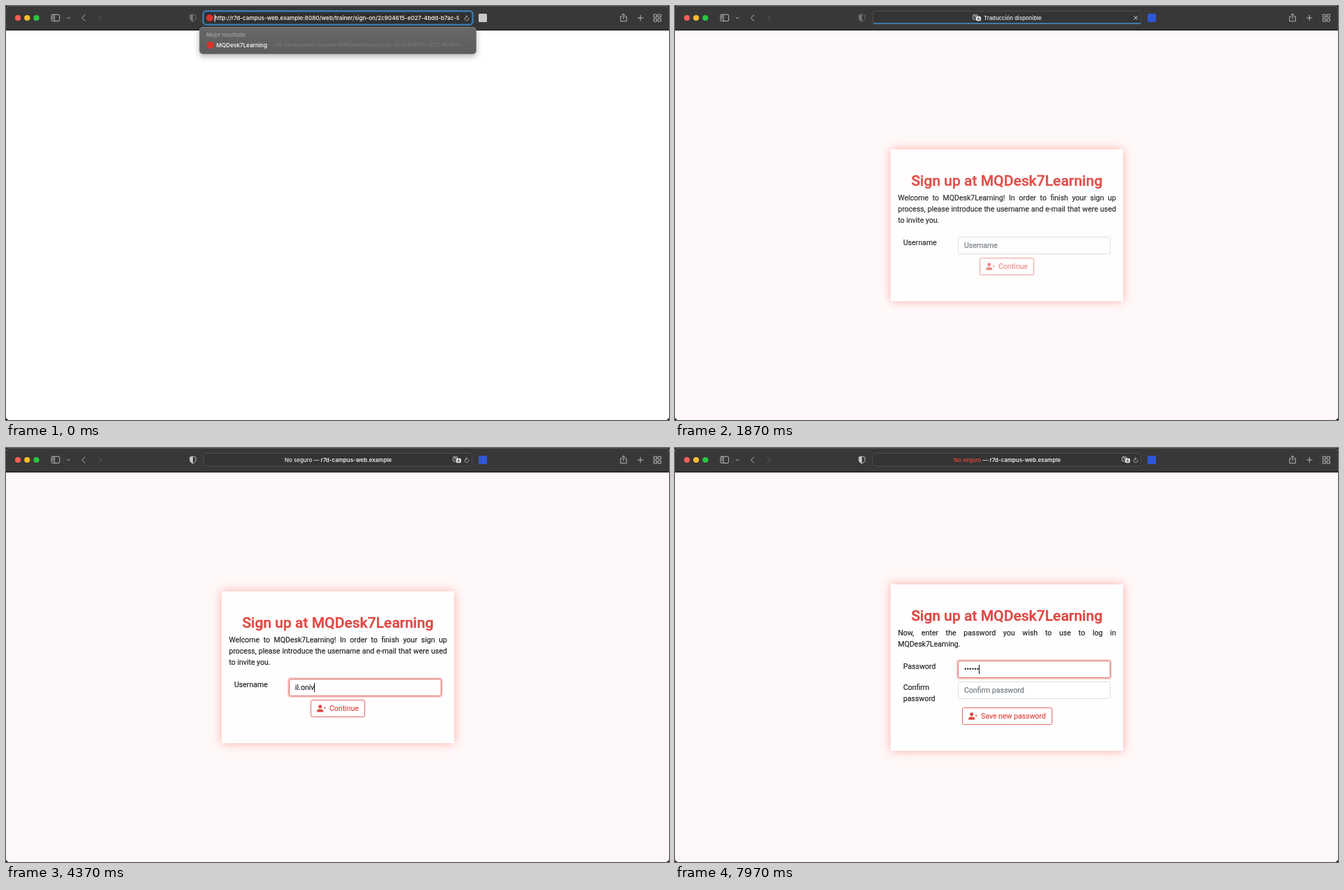
Write an HTML page that moves like this. It is 947 px wide and 592 px high and loops after 8000 ms.

```html
<!DOCTYPE html>
<html lang="en">
<head>
<meta charset="utf-8">
<title>Sign up</title>
<style>
  html, body { margin: 0; width: 100%; height: 100%; overflow: hidden; background: #000; }
  #win { position: absolute; left: 0; top: 0; width: 947px; height: 592px; overflow: hidden; border-radius: 5px; background: #fff; }
  svg { position: absolute; left: 0; top: 0; }
  #bar text, #drop { font-family: Inter, sans-serif; font-weight: 500; }
  #drop { position: absolute; left: 276px; top: 30px; width: 394px; height: 37px; border: 1px solid #858585; border-radius: 5px;
    background: linear-gradient(#676767, #5d5d5d); box-shadow: 0 3px 9px rgba(0,0,0,.3); white-space: nowrap; }
  #drop * { position: absolute; line-height: 12px; }
  #drop i { left: 10px; top: 20px; width: 10px; height: 10px; border-radius: 50%; background: #d8322c; }
  #drop small { left: 9px; top: 5px; font-size: 7.4px; font-weight: 600; color: #9c9c9c; }
  #drop b { left: 23.5px; top: 19px; font-size: 8.2px; font-weight: 500; color: #fff; }
  #drop span { left: 97px; top: 19px; width: 283px; font-size: 7.2px; font-weight: 400; color: #7d7d7d; overflow: hidden; text-overflow: ellipsis; }
  #page { position: absolute; inset: 0; font: 10.52px/16px Roboto, sans-serif; color: #1b1e22; -webkit-text-stroke: .15px; }
  .card { position: absolute; left: 308px; width: 332px; background: #fffefe; box-shadow: 0 0 13px rgba(244,67,54,.42); }
  .card > * { position: absolute; }
  h1 { left: 0; top: 32.1px; width: 332px; margin: 0; font-size: 21.04px; line-height: 25px; font-weight: 500; text-align: center;
    color: #e04641; white-space: nowrap; -webkit-text-stroke: .35px; }
  p { left: 10.5px; top: 61.6px; width: 311.5px; margin: 0; }
  p span { display: block; white-space: nowrap; }
  p .j { text-align: justify; text-align-last: justify; }
  label { left: 18px; width: 70px; }
  .field { left: 96px; width: 217.5px; height: 25px; box-sizing: border-box; padding-left: 8px; border: 1px solid #dadfe3; border-radius: 2.6px;
    background: #fff; line-height: 23.4px; white-space: nowrap; }
  .field u { display: inline-block; width: .8px; height: 12.5px; margin-right: -.8px; background: #111; vertical-align: -2.5px; }
  .field em { font-style: normal; color: #6c757d; }
  .btn { height: 25px; box-sizing: border-box; border: 1px solid #dc6965; border-radius: 2.6px; color: #e04641; line-height: 23.4px; padding-left: 26px; white-space: nowrap; }
  .btn svg { left: 8px; top: 6px; }
</style>
</head>
<body>
<div id="win">
  <div id="page">
    <div class="card" id="c1" style="top:205px;height:217px">
      <h1>Sign up at MQDesk7Learning</h1>
      <p><span class="j">Welcome to MQDesk7Learning! In order to finish your sign up</span>
        <span class="j">process, please introduce the username and e-mail that were used</span>
        <span>to invite you.</span></p>
      <label style="top:125.6px">Username</label>
      <div class="field" id="user" style="top:125.2px"></div>
      <div class="btn" id="go" style="left:127px;top:155.4px;width:78px">Continue</div>
    </div>
    <div class="card" id="c2" style="top:195px;height:238px">
      <h1>Sign up at MQDesk7Learning</h1>
      <p><span class="j">Now, enter the password you wish to use to log in</span>
        <span>MQDesk7Learning.</span></p>
      <label style="top:109.6px">Password</label>
      <div class="field" id="pass" style="top:109.2px"></div>
      <label style="top:139.6px">Confirm password</label>
      <div class="field" style="top:139.3px"><em>Confirm password</em></div>
      <div class="btn" style="left:102px;top:176.3px;width:129px">Save new password</div>
    </div>
  </div>

  <svg id="bar" width="947" height="36" fill="none" stroke-linecap="round" stroke-linejoin="round">
    <defs>
      <g id="tr">
        <rect x=".4" y=".4" width="7" height="6.4" rx="1.6" stroke="#ddd" stroke-width=".8"/>
        <path d="M2.2 2.4h3.4M3.9 1.6v.8M2.5 5l2.6-2.6" stroke="#ddd" stroke-width=".6"/>
        <rect x="5" y="2.4" width="7" height="6.6" rx="1.6" fill="#e6e6e6"/>
        <path d="M7.2 7.4 8.5 4l1.3 3.4M7.7 6.4h1.6" stroke="#333" stroke-width=".7"/>
      </g>
      <linearGradient id="fade"><stop offset="0" stop-color="#343434" stop-opacity="0"/><stop offset=".15" stop-color="#343434"/>
        <stop offset=".9" stop-color="#343434"/><stop offset="1" stop-color="#343434" stop-opacity="0"/></linearGradient>
      <clipPath id="clip"><rect x="297" y="8" width="350" height="18"/></clipPath>
    </defs>
    <rect width="947" height="35" fill="#383838"/>
    <path d="M0 .5H947" stroke="#565656" stroke-width=".8"/>
    <path d="M0 34.5H947" stroke="#111"/>
    <circle cx="17" cy="17" r="4.1" fill="#ff5f57"/><circle cx="30.2" cy="17" r="4.1" fill="#febc2e"/><circle cx="43.4" cy="17" r="4.1" fill="#28c840"/>
    <g stroke="#c6c6c6" stroke-width=".9">
      <rect x="65" y="12.2" width="11.6" height="9.4" rx="1.6"/><path d="M69.2 12.2v9.4M66.6 14.4h1M66.6 16.2h1M66.6 18h1"/>
      <path d="M87.2 16.2l2 1.8 2-1.8M112.8 12.8l-4.4 4.2 4.4 4.2"/>
      <path d="M131.8 12.8l4.4 4.2-4.4 4.2" stroke="#666"/>
      <path d="M82.5 12v10" stroke="#484848"/>
      <path d="M880 15h-2.2v6.8h8.6V15h-2.2M882.1 18.4v-7.2M880 13.2l2.1-2.1 2.1 2.1M902.4 17h7.6M906.2 13.2v7.6"/>
      <path d="M925.6 12.2h3.8v3.8h-3.8zM931.6 12.2h3.8v3.8h-3.8zM925.6 18.2h3.8v3.8h-3.8zM931.6 18.2h3.8v3.8h-3.8z"/>
    </g>
    <g id="shield"><path d="M267 12l4.2 1.3v4.2q0 3-4.2 4.7-4.2-1.7-4.2-4.7v-4.2z" stroke="#c8c8c8" stroke-width=".9"/>
      <path d="M267 12v10.2q-4.2-1.7-4.2-4.7v-4.2z" fill="#c8c8c8"/></g>
    <rect id="ext" x="675" y="11" width="12" height="12" rx="1.5"/>
    <rect x="282.3" y="7.5" width="383.4" height="18.4" rx="4" fill="#343434" stroke="#525252" stroke-width=".9"/>
    <rect id="ring" x="281.6" y="7.2" width="385" height="19.6" rx="4.6" fill="#303030" stroke="#3a7cb2" stroke-width="2.4"/>
    <circle id="fav" cx="291" cy="17" r="5" fill="#d8322c"/>
    <g clip-path="url(#clip)"><text id="url" y="20" font-size="8.15" fill="#fff"></text></g>
    <path id="ucaret" d="M298.2 12.2v10.4" stroke="#fff" stroke-width=".9"/>
    <rect id="prog" x="283.5" y="24.2" height="1.5" fill="#3f8fd2"/>
    <g id="offer"><rect x="420" y="9" width="108" height="15" fill="url(#fade)"/><text x="441" y="19.8" font-size="7.8" fill="#f2f2f2">Traducción disponible</text></g>
    <use id="tri" href="#tr" y="12.3"/>
    <text id="host" x="474.5" y="20" font-size="7.95" text-anchor="middle" fill="#eee"><tspan id="warn">No seguro</tspan> — <tspan font-weight="600">r7d-campus-web.example</tspan></text>
    <path id="stop" d="M655.6 14.4l5 5M660.6 14.4l-5 5" stroke="#ddd" stroke-width="1"/>
    <path id="reload" d="M660.9 17a2.9 2.9 0 1 1-2.2-1.9M657.4 13.5l1.6 1.6-1.6 1.5" stroke="#c4c4c4" stroke-width=".8"/>
  </svg>
  <div id="drop"><small>Mejor resultado</small><i></i><b>MQDesk7Learning</b><span id="hint"></span></div>

  <svg width="947" height="592">
    <path id="arrow" d="M0 0V9L2 7.2 3.4 10.5 5 9.8 3.6 6.6H6.3Z" fill="#111" stroke="#fff" stroke-width=".7"/>
    <path id="beam" d="M-2.2-5.4Q0-5.4 0-4Q0-5.4 2.2-5.4M0-4.2V4.2M-2.2 5.4Q0 5.4 0 4Q0 5.4 2.2 5.4M-1.1 1.6H1.1" fill="none" stroke="#222" stroke-width="1"/>
  </svg>
</div>
<script>
const LOOP = 8000;
const el = {};
document.querySelectorAll('[id]').forEach(e => el[e.id] = e);

const address = 'r7d-campus-web.example:8080/web/trainer/sign-on/2c904615-e027-4bdd-b7ac-90d1';
el.hint.textContent = '— ' + address;
document.querySelectorAll('.btn').forEach(b => b.insertAdjacentHTML('beforeend',
  '<svg width="14" height="11" fill="#e04641"><circle cx="4.7" cy="2.8" r="2.5"/>' +
  '<path d="M.2 10.4V9Q.4 6.5 3 6.5H6.4Q9 6.5 9.2 9V10.4ZM9.6 4.4h3.2v.8H9.6zM10.8 3.2h.8v3.2h-.8z"/></svg>'));

const ramp = (t, a, b) => Math.min(1, Math.max(0, (t - a) / (b - a)));
const mix = (a, b, p) => a + (b - a) * p;
const show = (e, v) => { e.style.opacity = +v; };

// Linear interpolation through rows of [time, ...values]
function track(rows, t) {
  let i = 0;
  while (i < rows.length - 2 && t >= rows[i + 1][0]) i++;
  const [a, b] = [rows[i], rows[i + 1]], p = ramp(t, a[0], b[0]);
  return a.slice(1).map((v, k) => mix(v, b[k + 1], p));
}

const count = (times, t) => times.filter(x => t >= x).length;
const userKeys = [3370, 3530, 4170, 4270, 4370, 4370, 4370, 4500, 4670, 4870];
const passKeys = [7300, 7430, 7600, 7670, 7830, 7970];
const progress = [[1130, 0], [1230, 26], [1500, 130], [1850, 382]];
const drift = [[6230, 535, 343], [6600, 526, 330], [6740, 525, 324.5]];

function field(e, value, hint, focus) {
  const html = value + (focus ? '<u></u>' : '') + (value ? '' : `<em>${hint}</em>`);
  if (e.last !== html) e.innerHTML = e.last = html;
  e.style.borderColor = `rgb(${mix(218, 220, focus)},${mix(223, 105, focus)},${mix(227, 101, focus)})`;
  e.style.boxShadow = `0 0 0 2px rgba(224,70,65,${.25 * focus})`;
}

function pointer(t) {
  let pos = null;
  if (t >= 2000 && t < 3370) {
    const p = 1 - (1 - ramp(t, 2000, 2660)) ** 2;
    pos = [mix(868, 536.5, p), mix(404, 350, p)];
  } else if (t >= 6230 && t < 7270) pos = track(drift, t);
  const inside = (x, y, top) => x > 404 && x < 621 && y > top && y < top + 25;
  const tops = t < 5370 ? [330] : [304, 334];
  const beam = pos && tops.some(top => inside(...pos, top));
  show(el.arrow, pos && !beam);
  show(el.beam, beam);
  if (pos) for (const e of [el.arrow, el.beam]) e.setAttribute('transform', `translate(${pos})`);
}

function toolbar(t) {
  const edit = t < 1130, loading = t >= 1130 && t < 1900;
  for (const e of [el.ring, el.fav, el.drop]) show(e, edit);
  show(el.ucaret, edit && (t < 470 || t >= 930));
  el.url.textContent = (edit ? 'http://' : '') + address;
  el.url.setAttribute('x', edit ? 298 : mix(298, 410, ramp(t, 1130, 1220)));
  show(el.url, edit ? 1 : .52 * (1 - ramp(t, 1240, 1360)));
  show(el.shield, t < 1900 ? .42 : 1);
  el.ext.setAttribute('fill', edit ? '#c9c9c9' : '#3057d6');
  el.prog.setAttribute('width', track(progress, t)[0]);
  show(el.prog, loading);
  show(el.stop, loading);
  show(el.reload, !loading);

  const swap = ramp(t, 3170, 3370), come = ramp(t, 1130, 1220);
  show(el.offer, come * (1 - swap));
  show(el.tri, come);
  el.tri.setAttribute('x', mix(425, 638, swap));
  show(el.host, swap);
  el.warn.setAttribute('fill', t >= 6800 ? '#f0443c' : '#eee');
}

function render(t) {
  toolbar(t);
  el.page.style.background = t < 1160 ? '#fff' : '#fff8f8';
  show(el.c1, t < 5370 ? ramp(t, 1160, 1910) : 0);
  show(el.c2, t >= 5370);
  show(el.go, mix(.65, 1, ramp(t, 3890, 4040)));
  field(el.user, 'il.onivres'.slice(0, count(userKeys, t)), 'Username', ramp(t, 2820, 3000));
  field(el.pass, '•'.repeat(count(passKeys, t)), 'Password', ramp(t, 6740, 6900));
  pointer(t);
}

const start = performance.now();
function tick() {
  render((performance.now() - start) % LOOP);
  requestAnimationFrame(tick);
}
tick();
</script>
</body>
</html>
```
